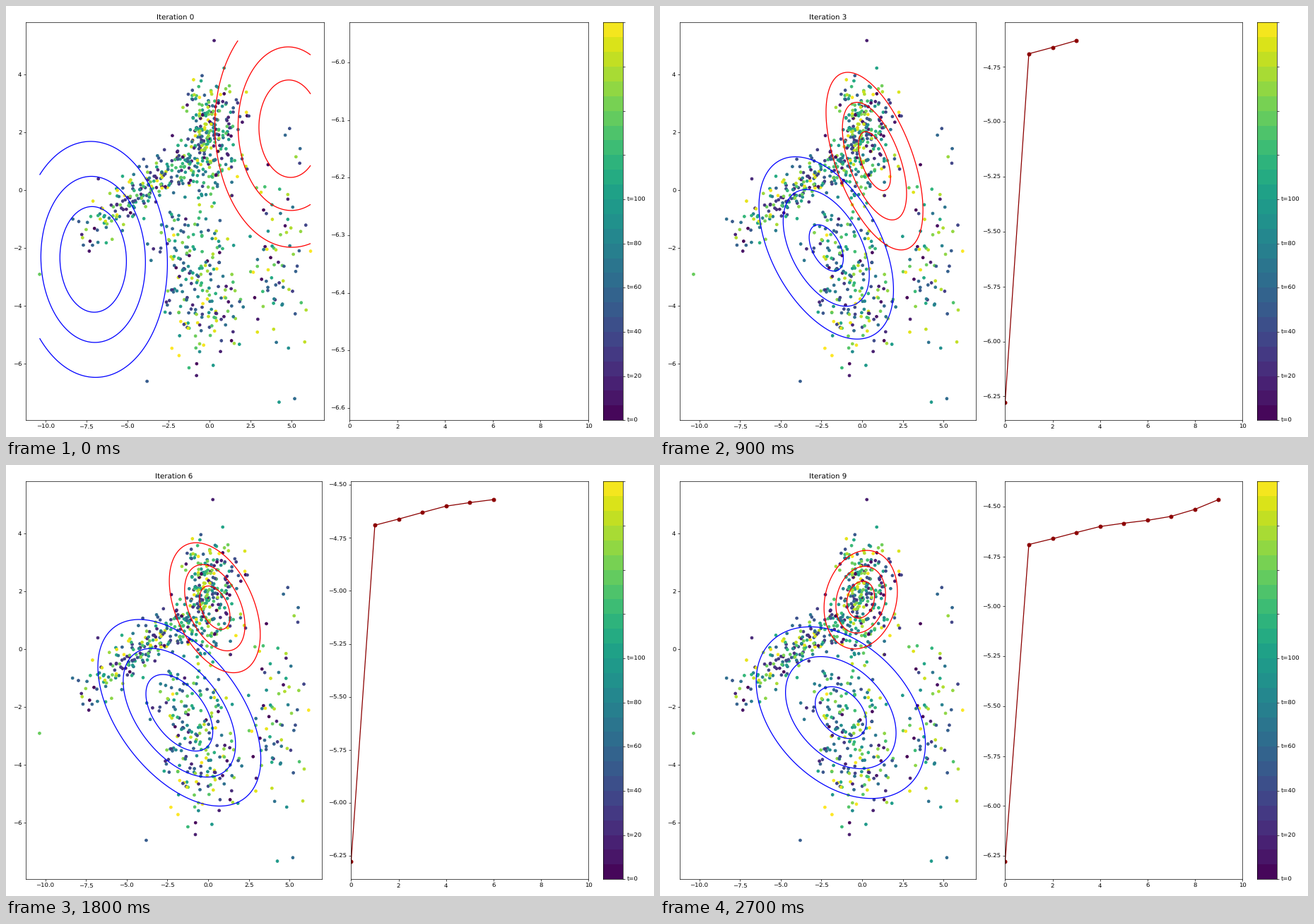
A matplotlib script for the animation above (3 s loop, 917 by 611 pixels).

```python
import matplotlib.pyplot as plt
import numpy as np
from matplotlib.animation import FuncAnimation

W, H = 917, 611
DPI = 61.13
plt.rcParams["font.family"] = "DejaVu Sans"
plt.rcParams["text.hinting"] = "none"

LOG_LIK = [-6.276, -4.690, -4.661, -4.630, -4.600,
           -4.5833, -4.569, -4.549, -4.514, -4.465]

# Each Gaussian: mean x, mean y, sigma x, sigma y, correlation,
# at the start and at a few later iterations joined by a cubic.
KEY_ITERATIONS = [2, 4, 7, 9]
BLUE_START = (-7.086, -2.385, 2.73, 2.46, -.033)
BLUE_KEYS = [(-2.380, -1.808, 2.512, 2.072, -.383),
             (-2.047, -2.103, 2.844, 2.035, -.500),
             (-1.626, -2.193, 3.170, 1.957, -.460),
             (-1.310, -2.186, 3.340, 1.908, -.363)]
RED_START = (4.895, 2.134, 2.806, 2.522, -.030)
RED_KEYS = [(0.891, 0.775, 1.931, 2.243, -.580),
            (0.642, 1.194, 1.862, 1.733, -.525),
            (0.273, 1.533, 1.694, 1.311, -.291),
            (-.087, 1.720, 1.406, 1.064, .168)]

# Isolated points that set the extent of the cloud
EXTREMES = [(-10.35, -2.9), (.29, 5.18), (4.25, -7.32), (6.17, -2.1),
            (4.89, 2.14), (-6.77, .4), (-3.8, -6.6), (5.2, -7.2)]
X_RANGE, Y_RANGE = (-10.35, 6.17), (-7.32, 5.18)


def make_points():
    rng = np.random.default_rng(7)

    def blob(n, centre, spread, rho=0):
        z = rng.normal(0, 1, (n, 2))
        z[:, 1] = rho * z[:, 0] + np.sqrt(1 - rho**2) * z[:, 1]
        return centre + z * spread

    u = rng.beta(2.2, 1.6, 185)
    band = np.column_stack([-8.6 + 7.6 * u, -2.1 + 3.4 * u**.85])
    band += rng.normal(0, (.3, .38), band.shape)
    xy = np.vstack([band,
                    blob(290, (0, 1.9), (.85, .95)),
                    blob(225, (-.9, -2.9), (1.3, 1.55), -.35),
                    blob(75, (4.2, -2.2), (.9, 1.6))])
    x, y = xy.T
    inside = (x < X_RANGE[1]) & (y > -6.6) & (y < 4.4)
    xy = rng.permutation(xy[inside])
    return np.vstack([xy, EXTREMES]), rng.uniform(0, 1, len(xy) + len(EXTREMES))


def gaussian(start, keys, i):
    """Density of the mixture component at iteration i on the grid."""
    coeffs = np.polyfit(KEY_ITERATIONS, keys, 3)
    mx, my, sx, sy, rho = start if i == 0 else np.vander([i], 4)[0] @ coeffs
    u, v = (GX - mx) / sx, (GY - my) / sy
    q = 1 - rho**2
    return (np.exp(-(u**2 - 2 * rho * u * v + v**2) / (2 * q))
            / (2 * np.pi * sx * sy * np.sqrt(q)))


def box(left, right, top=23.4, bottom=587.2):
    return [left / W, 1 - bottom / H, (right - left) / W, (bottom - top) / H]


GX, GY = np.meshgrid(np.linspace(*X_RANGE, 160), np.linspace(*Y_RANGE, 160))

fig = plt.figure(figsize=(W / DPI, H / DPI), dpi=DPI, facecolor="white")
ax = fig.add_axes(box(28.4, 450.2))
ax_ll = fig.add_axes(box(486, 824))
ax_bar = fig.add_axes(box(845.3, 873.3))

points, shades = make_points()
ax.scatter(*points.T, c=shades, cmap="viridis", s=20, zorder=1)
ax.set_xlim(-11.176, 6.996)
ax.set_ylim(-7.945, 5.805)
title = ax.set_title("", pad=5)
contours = []

trace, = ax_ll.plot([], [], "o-", color="darkred")
ax_ll.set_xlim(0, 10)

BANDS = 27
ax_bar.pcolormesh([0, 1], np.linspace(0, 180, BANDS + 1),
                  (np.arange(BANDS)[:, None] + .5) / BANDS,
                  cmap="viridis", vmin=0, vmax=1)
ax_bar.set_xticks([])
ax_bar.yaxis.tick_right()
times = range(0, 181, 20)
ax_bar.set_yticks(times, [f"t={t}" if t <= 100 else "" for t in times])


def draw(i):
    wide_labels = i >= 3
    ax.set_position(box(28.4, 447.3 if wide_labels else 450.2))
    ax_ll.set_position(box(488.4 if wide_labels else 486, 824))
    title.set_text(f"Iteration {i}")

    while contours:
        contours.pop().remove()
    for start, keys, color in ((BLUE_START, BLUE_KEYS, "blue"),
                               (RED_START, RED_KEYS, "red")):
        density = gaussian(start, keys, i)
        contours.append(ax.contour(GX, GY, density, 3, colors=color, zorder=2))

    seen = LOG_LIK[:i + 1] if i else []
    trace.set_data(range(len(seen)), seen)
    if seen:
        lo, hi = min(seen), max(seen)
        pad = .05 * (hi - lo)
    else:
        lo = hi = LOG_LIK[0]
        pad = .055 * abs(lo)
    ax_ll.set_ylim(lo - pad, hi + pad)
    return []


anim = FuncAnimation(fig, draw, frames=10, interval=300, repeat=True,
                     repeat_delay=0, init_func=lambda: draw(0))
plt.show()
```
